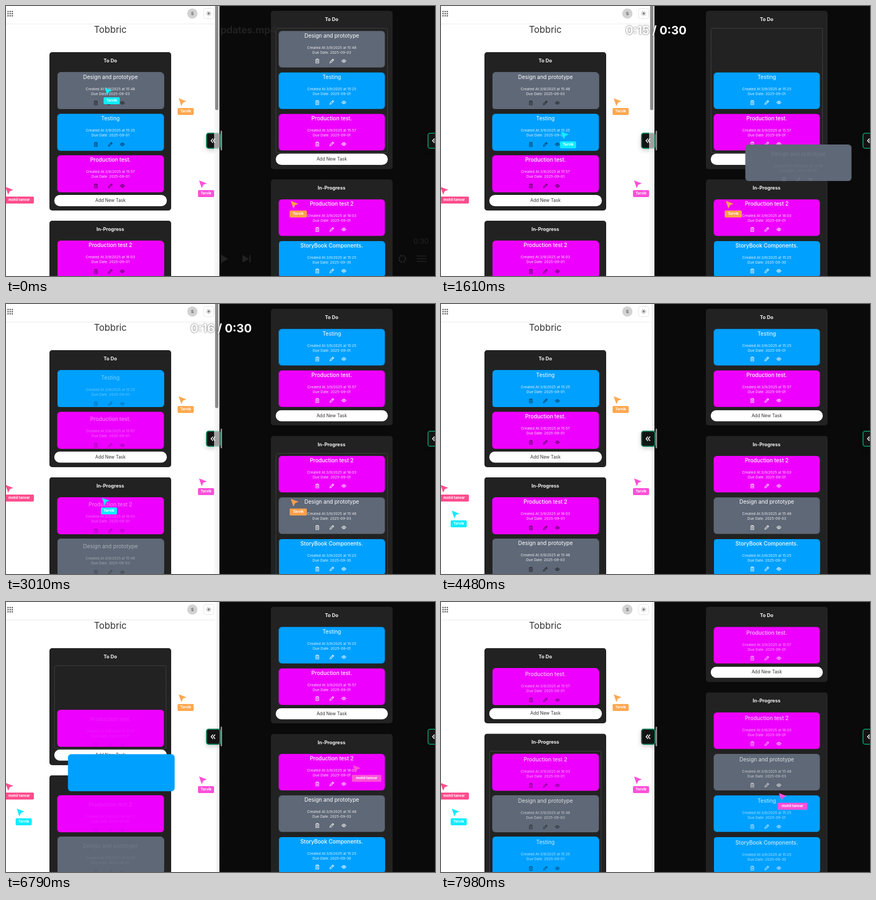
These frames come from a looping animation (800x503 px, 8 s). An HTML page:

```html
<!DOCTYPE html>
<html lang="en">
<head>
<meta charset="utf-8">
<title>Shared task board</title>
<style>
  html, body { margin: 0; width: 100%; height: 100%; overflow: hidden; background: #0a0a0a; }
  #stage { position: relative; width: 800px; height: 503px; overflow: hidden; font-family: Inter, Roboto, sans-serif; }
  #stage div, #stage svg { position: absolute; box-sizing: border-box; white-space: nowrap; }
  .pane { top: 0; height: 503px; overflow: hidden; isolation: isolate; }
  #light { left: 0; width: 398px; background: linear-gradient(90deg, #fff 390px, #e6e6e6 398px); color: #333; }
  #dark { left: 398px; width: 402px; background: #0a0a0a; }
  .board { left: 0; top: 0; }
  #dark .board { left: 14.7px; top: -77.5px; }
  .col { left: 81px; top: 0; width: 227px; height: 295px; border-radius: 5px; background: #222; }
  .col b { position: absolute; top: 9px; width: 100%; text-align: center; font: 700 9px/14px Inter, Roboto, sans-serif; color: #f2f2f2; }
  .zone { left: 9px; right: 9px; top: 32px; bottom: 30px; border: 1px dotted #5c5c5c; border-radius: 4px; }
  .add { left: 90px; width: 209.5px; height: 21px; border-radius: 11px; background: #fff; color: #333; font-size: 8.3px; line-height: 21px; text-align: center; }
  .card { left: 0; top: 0; width: 198.5px; height: 68.7px; border-radius: 6px; color: #fff; }
  .info { inset: 0; text-align: center; }
  .info div { width: 100%; }
  .name { top: 1px; font-size: 10px; line-height: 15px; }
  .made, .due { font-size: 6.7px; line-height: 9px; opacity: .88; }
  .made { top: 27.3px; }
  .due { top: 36.3px; }
  .icons { left: 67px; top: 51.5px; fill: none; stroke-width: 1.1; stroke: #ffffffd0; }
  #light .icons { stroke: #00000090; }
  .cursor { left: 0; top: 0; color: var(--tint); }
  .cursor svg { fill: currentColor; }
  .cursor div { left: -2px; top: 17.5px; width: var(--w); height: 13px; border-radius: 2px; background: var(--tint); font: 700 6.6px/13px Inter, Roboto, sans-serif; text-align: center; }
  .cursor span { color: #fff; }
  .tab { top: 235.5px; width: 30px; height: 30px; border: 2px solid #0d8059; border-radius: 5px; background: #131313; box-shadow: 0 3px 8px #0003; }
  .tab svg { left: 6px; top: 8px; fill: none; stroke: #eee; stroke-width: 1.7; }
  #clock { left: 344px; top: 32px; font-size: 21.7px; font-weight: 700; line-height: 26px; color: #fff; text-shadow: 0 0 2px #0009, 0 0 4px #0004; }
  #clock div { left: 0; top: 0; }
  #player { inset: 0; color: #2b2b2b; }
</style>
</head>
<body>
<div id="stage">
  <div id="dark" class="pane"></div>
  <div id="light" class="pane">
    <svg width="398" height="34">
      <g fill="#6b6b6b" id="apps"></g>
      <path d="M0 33.5H389" stroke="#e9e9e9"/>
      <circle cx="347.5" cy="14" r="9.5" fill="#d2d2d2"/>
      <text x="347.5" y="17" font-size="8" font-weight="600" text-anchor="middle" fill="#555">S</text>
      <rect x="368.5" y="4.5" width="19" height="19" rx="4" fill="#fff" stroke="#e4e4e4"/>
      <circle cx="378" cy="14" r="2.4" fill="#8a8a8a"/>
      <circle cx="378" cy="14" r="4" fill="none" stroke="#999" stroke-width="1.4" stroke-dasharray="1.2 1.94"/>
    </svg>
    <div style="left:0;width:389px;top:33px;text-align:center;font-size:17px;line-height:23px">Tobbric</div>
  </div>
  <div class="tab" style="left:373px;width:27px"><svg width="10" height="10"><path d="M5 1 1.5 5 5 9M9 1 5.5 5 9 9"/></svg></div>
  <div class="tab" style="left:785.5px"><svg width="10" height="10"><path d="M5 1 1.5 5 5 9M9 1 5.5 5 9 9"/></svg></div>
  <div id="scroll" style="left:388px;top:0;width:10px;height:503px;background:#f4f4f4a0">
    <div style="left:2px;top:0;width:6px;height:194px;border-radius:0 0 3px 3px;background:#8b8b8b"></div>
  </div>
  <div style="left:399.5px;top:232px;width:3.5px;height:37px;border-radius:2px;background:#858585"></div>
  <div id="cursors" style="left:0;top:0"></div>
  <div id="player">
    <svg width="800" height="503" fill="currentColor">
      <text x="400" y="51" font-size="18" font-weight="600">pdates.mp4</text>
      <text x="760" y="443" font-size="13">0:30</text>
      <path d="M401 463 414 471 401 479ZM441 464 453 471 441 478ZM454 464h2v14h-2ZM766 465h18v1.5h-18ZM766 470h18v1.5h-18ZM766 475h18v1.5h-18Z"/>
      <circle cx="739" cy="471" r="6" fill="none" stroke="currentColor" stroke-width="3" stroke-dasharray="3 1.7"/>
    </svg>
  </div>
  <div id="clock"></div>
</div>
<script>
const LOOP = 8000, PITCH = 77.3, HOME = 95.5, SMOOTH = 'ease-in-out';
const $ = id => document.getElementById(id);

function add(parent, cls, html = '') {
  const el = document.createElement('div');
  el.className = cls;
  el.innerHTML = html;
  parent.append(el);
  return el;
}

// Stops are [ms, value, easing to the next stop]; without easing the value holds.
function track(el, prop, stops) {
  const frames = stops.map(([ms, value, easing = 'step-end']) => ({ offset: ms / LOOP, [prop]: value, easing }));
  frames.push({ offset: 1, [prop]: stops.at(-1)[1] });
  el.animate(frames, { duration: LOOP, iterations: Infinity });
}

const at = (x, y) => `${x}px ${y}px`;
const path = points => points.map(([ms, x, y, easing]) => [ms, at(x, y), easing]);
const byTime = (a, b) => a[0] - b[0];
const show = (el, from, to) =>
  track(el, 'opacity', [...(from ? [[0, 0]] : []), [from, 1], ...(to < LOOP ? [[to, 0]] : [])]);

// Card text fades in while rising 10px; the last entrance may be cut by the loop end.
const ENTER = 500;
function enter(ms) {
  const end = Math.min(ms + ENTER, LOOP);
  const left = 1 - (end - ms) / ENTER;
  return [[ms, 0, 'ease-out'], [end, 1 - left * left]];
}

const ICONS = `<svg class="icons" width="62" height="10">
  <path d="M1.5 2.5H8.5M3.5 2.3V1.2H6.5V2.3M2.3 2.8V8.8H7.7V2.8M4.2 4.3V7M5.8 4.3V7"/>
  <path d="M28.5 8.5 29 6.3 34 1.3 35.7 3 30.7 8ZM32.8 2.5 34.5 4.2"/>
  <path d="M50.5 5Q54.5-.5 58.5 5Q54.5 10.5 50.5 5Z"/><circle cx="54.5" cy="5" r="1.3"/></svg>`;

const BLUE = '#00a0ff', PINK = '#ee00ff', SLATE = '#5f6877';
const tasks = {
  story: ['StoryBook Components.', '15:25', '30', BLUE, 500],
  second: ['Production test 2', '16:03', '01', PINK, 500],
  first: ['Production test.', '15:57', '01', PINK, 500],
  testing: ['Testing', '15:25', '01', BLUE, 400],
  design: ['Design and prototype', '15:48', '03', SLATE, 400]
};

const todo = i => 123.5 + PITCH * i;
const tops = {
  story: [514.6, 514.6, 514.6],
  second: [437.3, 360, 282.7],
  first: [todo(2), todo(1), todo(0)],
  testing: [todo(1), todo(0), 437.3],
  design: [todo(0), 437.3, 360]
};

// `moves` adds stops for cards that are dragged or pushed aside before a reflow.
function makeBoard(pane, { reflow, entries, zones, moves, drag }) {
  const board = add(pane, 'board');
  const times = [0, ...reflow];
  const stepped = (el, prop, fn) => track(el, prop, times.map((ms, i) => [ms, fn(i)]));

  const columns = ['To Do', 'In-Progress'].map(title => add(board, 'col', `<b>${title}</b>`));
  columns[0].style.top = '86px';
  columns[1].style.height = '400px';
  stepped(columns[0], 'height', i => `${295 - PITCH * i}px`);
  stepped(columns[1], 'translate', i => at(0, 400 - PITCH * i));
  columns.forEach((col, i) => show(add(col, 'zone'), ...zones[i]));
  stepped(add(board, 'add', 'Add New Task'), 'translate', i => at(0, 352 - PITCH * i));

  for (const [key, [name, made, due, color, weight]] of Object.entries(tasks)) {
    const card = add(board, 'card', `<div class="info">
      <div class="name" style="font-weight:${weight}">${name}</div>
      <div class="made">Created At:3/9/2025 at ${made}</div>
      <div class="due">Due Date: 2025-09-${due}</div>${ICONS}</div>`);
    card.style.background = color;
    const points = [...times.map((ms, i) => [ms, HOME, tops[key][i]]), ...(moves[key] || [])];
    track(card, 'translate', path(points.sort(byTime)));

    const dragged = drag.key === key;
    if (dragged) card.style.zIndex = 1;
    const starts = entries.filter(ms => !dragged || ms < drag.from || ms >= drag.to);
    const held = dragged ? [[drag.from, drag.alpha]] : [];
    const fade = [[0, 1], ...held, ...starts.flatMap(enter)].sort(byTime);
    track(card.firstChild, 'opacity', fade);
    track(card.firstChild, 'translate', fade.map(([ms, alpha, easing]) => [ms, at(0, 10 * (1 - alpha)), easing]));
  }
}

const nudge = (ms, from, to) => [[ms, HOME, from, 'ease-out'], [ms + 180, HOME, to]];

makeBoard($('light'), {
  reflow: [2850, 7720],
  entries: [2850, 6755, 7720],
  zones: [[5600, 7000], [7000, LOOP]],
  moves: {
    testing: [[6000, HOME, todo(0), SMOOTH], [6790, 115.5, 283.5, SMOOTH], [7450, 103, 495, 'ease-out'], [7700, HOME, 514.6]],
    first: nudge(7000, todo(1), todo(0)),
    story: nudge(7000, 514.6, 592)
  },
  drag: { key: 'testing', from: 6000, to: 7720, alpha: 0 }
});

makeBoard($('dark'), {
  reflow: [2500, 7730],
  entries: [2500, 7730],
  zones: [[0, 2000], [2000, 3400]],
  moves: {
    design: [[800, HOME, todo(0), SMOOTH], [1610, 154.5, 335, SMOOTH], [2300, 108, 498, 'ease-out'], [2490, HOME, 514.6]],
    testing: nudge(2000, todo(1), todo(0)),
    first: nudge(2000, todo(2), todo(1)),
    story: nudge(2000, 514.6, 592)
  },
  drag: { key: 'design', from: 800, to: 2500, alpha: .12 }
});

function makeCursor(name, tint, width, points, from = 0, to = LOOP) {
  const el = add($('cursors'), 'cursor',
    `<svg width="16" height="16"><path d="M0 0 14.5 5.5 8 8 5 14.5Z"/></svg><div><span>${name}</span></div>`);
  el.style.setProperty('--tint', tint);
  el.style.setProperty('--w', `${width}px`);
  track(el, 'translate', path(points));
  show(el, from, to);
}

const ORANGE = '#ffa850', ROSE = '#ff50d8';
makeCursor('Tarvik', ORANGE, 30, [[0, 322, 172]]);
makeCursor('Tarvik', ROSE, 30, [[0, 360, 325]]);
makeCursor('mohil tanvar', '#ff4d8d', 55, [[0, -1, 337]]);
makeCursor('Tarvik', '#10ecff', 30, [
  [0, 184, 152], [850, 184, 152, SMOOTH], [1610, 224, 234, SMOOTH], [2500, 179, 361],
  [3200, 179, 361, SMOOTH], [4100, 20, 385]
]);
makeCursor('Tarvik', '#ffa04a', 32, [[0, 531, 363]], 0, 3700);
makeCursor('mohil tanvar', ROSE, 55, [
  [0, 590, 110], [5250, 590, 110, 'ease-out'], [5740, 625, 174], [6000, 625, 174, SMOOTH],
  [6790, 647, 304, SMOOTH], [7600, 630, 356]
], 5250);

const ticks = [300, 1300, 2300, 3500];
ticks.slice(0, -1).forEach((ms, i) => show(add($('clock'), '', `0:${14 + i} / 0:30`), ms, ticks[i + 1]));

track($('player'), 'opacity', [[0, .75, 'linear'], [300, 0]]);
track($('scroll'), 'opacity', [[0, 1], [3600, 1, 'linear'], [3800, 0]]);

for (let i = 0; i < 9; i++)
  $('apps').innerHTML += `<rect x="${2.5 + i % 3 * 4}" y="${9 + Math.floor(i / 3) * 4}" width="2.6" height="2.6" rx=".6"/>`;
</script>
</body>
</html>
```
